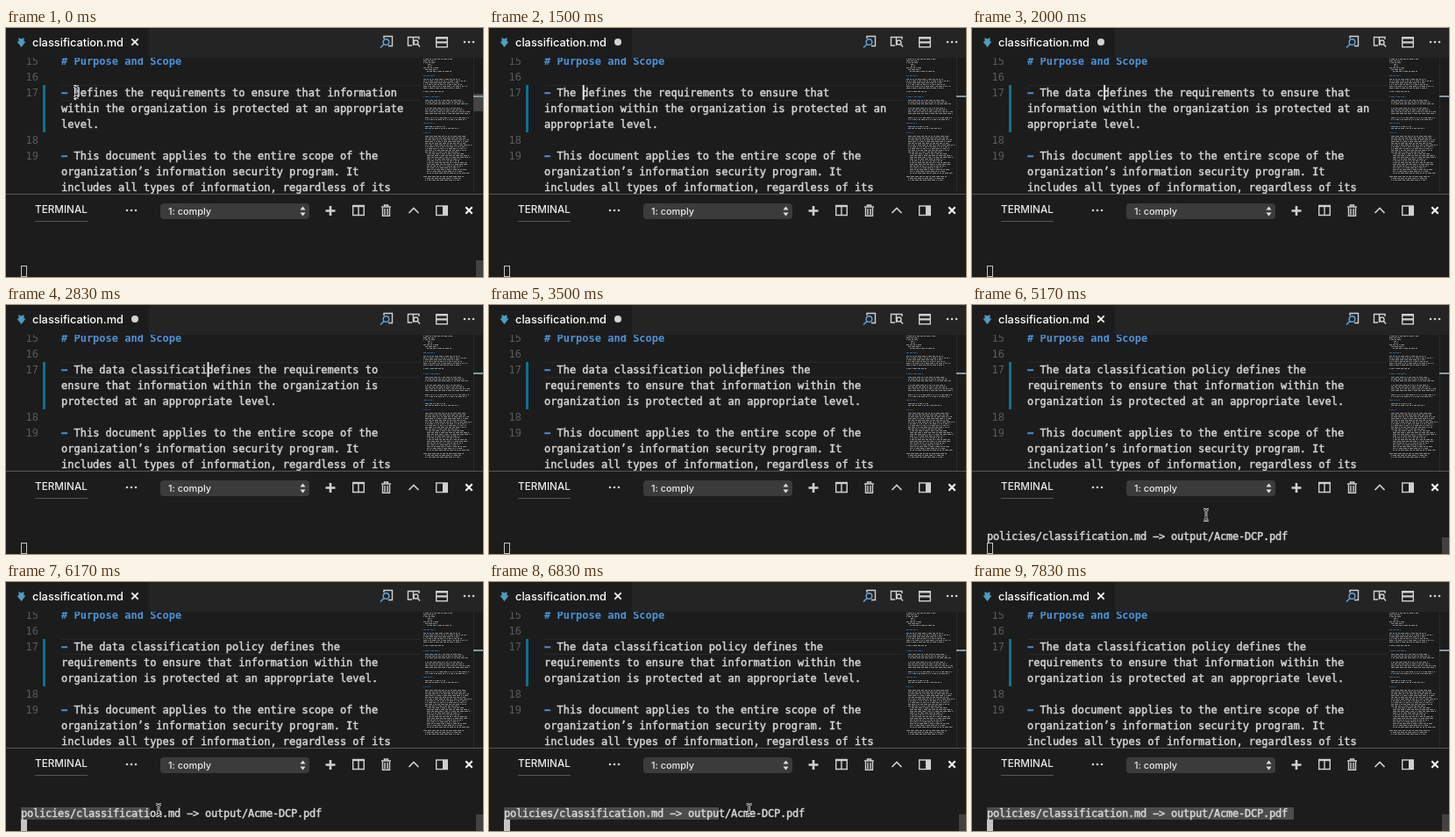
Write an HTML page that moves like this. It is 544 by 284 pixels and loops after 9.84 s.

```html
<!DOCTYPE html>
<html lang="en">
<head>
<meta charset="utf-8">
<title>Editing a policy</title>
<style>
  html, body { margin: 0; width: 100%; height: 100%; overflow: hidden; background: #1c1c1c; }
  svg { display: block; width: 544px; height: 284px; }
  text { white-space: pre; }
  .mono { font: 12px "DejaVu Sans Mono", monospace; fill: #d6d6d6; stroke: #d6d6d6; stroke-width: .45px; }
  .mono .mark, .mono.heading { fill: #4a94dc; stroke: #4a94dc; }
  .mono .mark { font-weight: bold; }
  .mono.heading { font-weight: bold; stroke: none; }
  .mono.number { fill: #5a5a5a; stroke: none; text-anchor: end; }
  .mono.shell { letter-spacing: -.224px; }
  .ui { font-family: Inter, sans-serif; font-weight: 500; fill: #ececec; }
  .icon { fill: none; stroke: #d0d0d0; stroke-width: 1.4; }
  .solid { fill: #d0d0d0; stroke: none; }
  .blue { stroke: #61a6dc; }
</style>
</head>
<body>
<svg viewBox="0 0 544 284">
  <defs>
    <clipPath id="editorClip"><rect y="34" width="544" height="155"/></clipPath>
    <path id="beam" d="M-3-6.500Q0-6.500 0-4.500Q0-6.500 3-6.500M0-4.500V4.500M-3 6.500Q0 6.500 0 4.500Q0 6.500 3 6.500M-1.500 2.500H1.500"/>
    <g id="dots" class="solid"><circle cx="-5" r="1.300"/><circle r="1.300"/><circle cx="5" r="1.300"/></g>
    <path id="cross" d="M-3.700-3.700L3.700 3.700M3.700-3.700L-3.700 3.700"/>
  </defs>
  <rect width="544" height="284" fill="#1c1c1c"/>

  <g clip-path="url(#editorClip)">
    <path d="M63 65.500H473M63 82.500H473" stroke="#282828"/>
    <rect x="42" y="65" width="3" height="54" fill="#0b7390"/>
    <g id="lines"></g>
    <g id="minimap" fill="none"></g>
    <path d="M533.500 34V189" stroke="#2b2b2b"/>
    <rect id="editorSlider" x="533" y="75" width="11" height="20" fill="#454545"/>
    <path d="M533 78H544" stroke="#8798a2" stroke-width="2"/>
    <rect id="caret" y="65" width="2" height="17" fill="#e4e4e4"/>
  </g>

  <rect x="163" width="381" height="34" fill="#242424"/>
  <path d="M14.500 11L17.500 12.500L20.500 11V15.500H22.500L17.500 22L12.500 15.500H14.500Z" fill="#4f9cc0"/>
  <text class="ui" x="30" y="21" font-size="12.800" style="fill:#fff">classification.md</text>
  <use id="closeTab" href="#cross" x="147" y="16" stroke="#f0f0f0" stroke-width="1.900"/>
  <circle id="unsaved" cx="147" cy="16" r="4" fill="#d2d2d2"/>

  <g class="icon">
    <path d="M431 12V9.500H440.500V20.500H436"/>
    <g class="blue"><circle cx="433.500" cy="16" r="3.300"/><path d="M431 18.500L427 22.500"/></g>
    <path d="M463 20H458.500V10.500H471V13M464.500 10.500V20"/>
    <circle cx="467.500" cy="16.500" r="2.500"/><path d="M469.500 18.500L472 21.500"/>
    <rect x="490.700" y="10.700" width="12.600" height="11"/>
    <path d="M490 11.500H504M490 16.300H504" stroke-width="2.200"/>
  </g>
  <use href="#dots" x="528" y="16"/>

  <path d="M0 189.500H544" stroke="#565656"/>
  <text class="ui" x="33" y="211" font-size="11.700">TERMINAL</text>
  <path d="M33 220.500H93" stroke="#555"/>
  <use href="#dots" x="143" y="208"/>
  <rect x="176" y="200" width="170" height="18" rx="4" fill="#3b3b3b"/>
  <text class="ui" x="185" y="213" font-size="10.900">1: comply</text>
  <path d="M335.500 207.500L338.500 203.500L341.500 207.500ZM335.500 210.500L338.500 214.500L341.500 210.500Z" fill="#e0e0e0"/>
  <g class="icon">
    <path d="M364.500 208.500H375.500M370 203V214" stroke-width="2.600"/>
    <path d="M395.700 203V213.500H408.300V203M402 203V213.500"/><path d="M395 203H409" stroke-width="2.400"/>
    <path d="M428 204H439M431.500 203.500V202H435.500V203.500M429.500 205V214.300H437.500V205M432 206V213M435 206V213"/>
    <path d="M459.500 211L465 205.500L470.500 211" stroke-width="1.700"/>
    <rect x="490.700" y="203" width="12.600" height="10.500"/><path class="solid" d="M498 203H503V213H498Z"/>
    <use href="#cross" x="528" y="208" stroke="#f0f0f0" stroke-width="2.200"/>
  </g>

  <rect id="selection" x="17" y="257" height="14" fill="#4c4c4c"/>
  <text id="output" class="mono shell" x="17" y="268">policies/classification.md −&gt; output/Acme-DCP.pdf</text>
  <rect id="shellSlider" x="536" y="265" width="8" height="19" fill="#424242"/>
  <rect id="block" x="17.500" y="271.500" width="6" height="12" stroke="#c4c4c4"/>
  <g id="pointer" fill="none">
    <use href="#beam" stroke="#eee" stroke-width="2.600"/>
    <use href="#beam" stroke="#111" stroke-width="1"/>
  </g>
</svg>
<script>
const LOOP = 9840, STEP = 1000 / 6;
const CHAR = 7.224, LEFT = 63, COLUMNS = 54;
const TYPED = "The data classification policy ";
const REST = "defines the requirements to ensure that information within the organization is protected at an appropriate level.";

const SLIDERS_FADE = 2, TYPE_START = 7, TYPE_END = 22, SAVED = 24, OUTPUT = 28, CLICK = 34, RELEASE = 47;
// step, x, y
const POINTER_PATH = [[30, 350, 232], [34, 18, 262], [36, 50, 261], [37, 174, 260], [43, 358, 260], [44, 389, 257], [46, 389, 256]];
// step, selected characters
const SELECTING = [[34, 0], [36, 4], [37, 21], [43, 42], [45, 50]];

const $ = id => document.getElementById(id);
const show = (id, on) => $(id).setAttribute("visibility", on ? "visible" : "hidden");

function add(parent, tag, attrs, content = "") {
  const node = document.createElementNS("http://www.w3.org/2000/svg", tag);
  for (const key in attrs) node.setAttribute(key, attrs[key]);
  node.textContent = content;
  return $(parent).appendChild(node);
}

function between(keys, step) {
  if (step <= keys[0][0]) return keys[0].slice(1);
  const next = keys.findIndex(key => key[0] > step);
  if (next < 0) return keys[keys.length - 1].slice(1);
  const a = keys[next - 1], b = keys[next], k = (step - a[0]) / (b[0] - a[0]);
  return a.slice(1).map((v, i) => v + (b[i + 1] - v) * k);
}

function wrap(text) {
  const rows = [""];
  for (const word of text.split(" ")) {
    const last = rows.length - 1, joined = rows[last] ? rows[last] + " " + word : word;
    if (joined.length > COLUMNS) rows.push(word);
    else rows[last] = joined;
  }
  return rows;
}

const row = (y, text = "", cls = "") => add("lines", "text", { x: LEFT, y, class: "mono " + cls }, text);

function setRow(node, text) {
  const bullet = text.startsWith("− ");
  node.textContent = bullet ? text.slice(1) : text;
  if (!bullet) return;
  const mark = document.createElementNS(node.namespaceURI, "tspan");
  mark.setAttribute("class", "mark");
  mark.textContent = "−";
  node.prepend(mark);
}

function buildEditor() {
  [[15, 42], [16, 60], [17, 78], [18, 132], [19, 150]].forEach(([n, y]) =>
    add("lines", "text", { x: 37, y, class: "mono number" }, n));
  row(42, "# Purpose and Scope", "heading");
  setRow(row(150), "− This document applies to the entire scope of the");
  row(168, "organization’s information security program. It");
  row(186, "includes all types of information, regardless of its");
}

// Blocks of tiny lines: top, rows, indent, longest width, heading?
function buildMinimap() {
  const blocks = [[35, 1, 0, 33], [37, 2, 0, 15], [41, 2, 5, 6], [45, 1, 0, 17], [47, 1, 2, 14], [49, 1, 4, 28],
    [54, 1, 0, 13, 1], [58, 6, 0, 56], [72, 1, 0, 24], [78, 1, 0, 19, 1], [82, 3, 2, 54], [91, 4, 2, 55],
    [102, 2, 2, 52], [108, 1, 0, 13, 1], [112, 1, 2, 24], [114, 1, 2, 38], [119, 1, 0, 9, 1],
    [123, 6, 2, 55], [135, 4, 2, 50], [143, 12, 4, 51], [169, 1, 0, 46], [171, 2, 2, 52]];
  let seed = 7;
  const random = () => (seed = seed * 16807 % 2147483647) / 2147483647;
  for (const [top, rows, indent, width, heading] of blocks)
    for (let i = 0; i < rows; i++) {
      const words = Array.from({ length: 8 }, () => 1 + Math.floor(random() * 4) + " 1").join(" ");
      const length = rows > 1 ? width * (.72 + .28 * random()) : width;
      add("minimap", "path", {
        d: `M${476 + indent} ${top + i * 2 + .5}h${Math.min(length, 56 - indent)}`,
        "stroke-dasharray": words, stroke: heading ? "#315f8b" : "#868686"
      });
    }
}

buildEditor();
buildMinimap();
const paragraph = [78, 96, 114].map(y => row(y));

function draw(step) {
  const typed = Math.max(0, Math.min(TYPED.length, Math.floor(2.1 * (step - TYPE_START))));
  const rows = wrap("− " + TYPED.slice(0, typed) + REST);
  paragraph.forEach((node, i) => setRow(node, rows[i] || ""));

  const dirty = typed > 0 && step < SAVED;
  show("unsaved", dirty);
  show("closeTab", !dirty);
  show("editorSlider", step < SLIDERS_FADE);
  show("shellSlider", step < SLIDERS_FADE || step >= OUTPUT);

  $("caret").setAttribute("x", LEFT + CHAR * (2 + typed) + .4);
  const blinkOn = step < TYPE_END || Math.floor((step - TYPE_END) / 3) % 2 === 0;
  show("caret", step < CLICK && blinkOn);

  show("output", step >= OUTPUT);
  $("block").setAttribute("fill", step >= CLICK ? "#c4c4c4" : "none");
  $("selection").setAttribute("width", 7 * Math.round(between(SELECTING, step)[0]));

  const [x, y] = typed ? between(POINTER_PATH, step) : [80, 73];
  $("pointer").setAttribute("transform", `translate(${x} ${y})`);
  show("pointer", !typed || step >= POINTER_PATH[0][0] && step < RELEASE);
}

let current = -1;
function tick() {
  const step = Math.floor((performance.now() % LOOP + 4) / STEP);
  if (step !== current) draw(current = step);
  requestAnimationFrame(tick);
}
tick();
</script>
</body>
</html>
```
